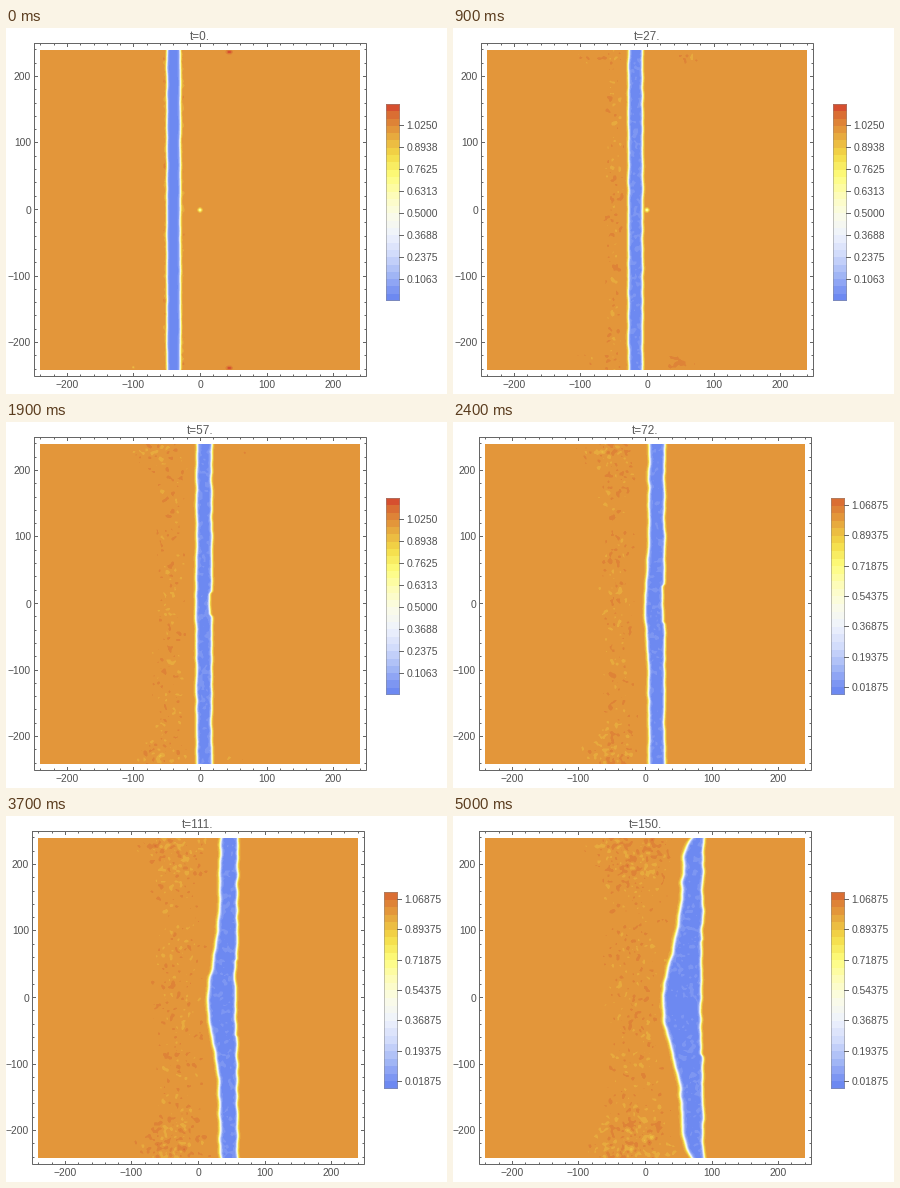
These frames come from a looping animation (441 by 366 pixels, 5.1 s). A matplotlib script:

```python
import numpy as np
import matplotlib.pyplot as plt
from matplotlib.animation import FuncAnimation
from matplotlib.colors import LinearSegmentedColormap

W, H, DPI = 441, 366, 100
FRAMES, STEP = 51, 3
T_END = STEP * (FRAMES - 1)
T_LEGEND = 60                   # the legend is rescaled from here on
PLOT = 320                      # side of the density plot in pixels
SUB = 2                         # supersampling
N = PLOT * SUB
CX, CY, SCALE = 194.5, 181.5, 0.6655
LOW, BAND = -0.025, 0.04375
GREY, INK = "#666666", "#505050"

plt.rcParams["font.family"] = "Liberation Sans"
rng = np.random.default_rng(12)

TEMPERATURE = LinearSegmentedColormap.from_list("temperature", [
    "#2e4eee", "#4f71f0", "#748ef2", "#a4b8f6", "#d1dbfb", "#eff3fd", "#fbfce8",
    "#fefdba", "#fdfc7b", "#f4dc48", "#e7a83e", "#db7334", "#d0222a"], N=1024)
PALETTE = TEMPERATURE(0.155 + 0.703 * (LOW + BAND * (np.arange(27) + 0.5)))[:, :3]

axis = (np.arange(N) + 0.5) / N * 480 - 240
X = axis[None, :]
Y = -axis[:, None]
WALL = 240 - np.abs(Y)          # distance to the upper or lower border


def noise(shape, sigma):
    """Periodic Gaussian noise with unit deviation."""
    freqs = np.meshgrid(*[np.fft.fftfreq(n) for n in shape], indexing="ij")
    blur = np.exp(-2 * (np.pi * sigma) ** 2 * sum(f ** 2 for f in freqs))
    out = np.fft.ifftn(np.fft.fftn(rng.normal(size=shape)) * blur).real
    return out / out.std()


GRAIN = [noise((N, N), 2.7) for _ in range(2)]
INNER = [noise((N, N), 2.6) for _ in range(2)]
FRONT = [noise((N,), 7)[:, None] for _ in range(2)]
BACK = [noise((N,), 7)[:, None] for _ in range(2)]


def blend(pair, angle):
    return np.cos(angle) * pair[0] + np.sin(angle) * pair[1]


def gauss(d, s):
    return np.exp(-0.5 * (d / s) ** 2)


def sigmoid(d):
    return 1 / (1 + np.exp(-np.clip(d, -40, 40)))


def edge(t, start, speed, drag, flare, rough):
    """Slowing wave edge whose ends bend forward at the borders."""
    s = t / T_END
    return (start + speed * t - drag * t ** 2 + flare * s ** 4 * np.exp(-WALL / 17)
            + (0.2 + 0.5 * s) * blend(rough, t / 25))


def front(t):
    half = 3 + 0.74 * max(t - 38, 0)
    dent = 4 * (1 - 0.5 * t / T_END) * sigmoid((t - 39) / 1.5)
    dent = dent * sigmoid(half - np.abs(Y))
    return edge(t, -29.5, 0.86, 0.0006, 4, FRONT) - dent


def back(t):
    bulge = 0.3 * max(t - 52, 0) * gauss(Y + 6, 18 + 0.34 * t)
    return edge(t, -49.5, 0.83, 0.0008, 13, BACK) - bulge


def ripple(t, left):
    """Strength of the specks around the wave."""
    s = t / T_END
    wake = gauss(X + 50 - 38 * s ** 2, 8 + 38 * s)
    rear = gauss(X + 110 - 80 * s, 12 + 35 * s) * gauss(WALL - 12, 8 + 24 * s)
    ahead = max(1 - t / 100, 0) * gauss(X - 48, 20) * gauss(WALL - 12, 10)
    behind = sigmoid((left - 4 - X) / 2)
    grow = 1 - np.exp(-t / 8)
    return grow * ((0.0145 * wake + 0.0135 * rear) * behind + 0.026 * ahead)


def field(t):
    s, turn = t / T_END, t / 13
    left, right = back(t), front(t)
    start = max(1 - t / 9, 0)
    amp = ripple(t, left) + 0.015 * start * (gauss(X - left + 4, 2) + gauss(X - right - 4, 2))
    outside = 1.005 + amp * blend(GRAIN, turn)
    inside = 0.004 + min(t / 15, 1) * 0.014 * blend(INNER, turn)
    hole = (sigmoid((X - left) / (0.9 + 0.5 * s))
            * sigmoid((right - X) / (0.95 + 0.15 * s)))
    u = outside * (1 - hole) + inside * hole
    if t < 33:
        u = u - 0.4 * gauss(np.hypot(X, Y), 1.9)
    u = u + 0.15 * start * gauss(X - 44, 2.8) * gauss(WALL - 3, 2)
    return u - 0.09 * start * gauss(X + 100, 1.3) * gauss(Y + 236, 1.3)


def render(t):
    band = np.clip((field(t) - LOW) // BAND, 0, 26).astype(int)
    return PALETTE[band].reshape(PLOT, SUB, PLOT, SUB, 3).mean((1, 3))


fig = plt.figure(figsize=(W / DPI, H / DPI), dpi=DPI, facecolor="white")
ax = fig.add_axes([0, 0, 1, 1])
ax.axis("off")


def text(x, y, s, px=10.2, ha="center", color=INK):
    return ax.text(x, y, s, fontsize=px * 0.72, ha=ha, va="center_baseline", color=color)


def line(xs, ys, color=GREY):
    return ax.plot(xs, ys, color=color, lw=0.72, snap=False,
                   solid_capstyle="projecting", solid_joinstyle="miter")[0]


def box(x0, y0, x1, y1, color=GREY):
    return line([x0, x1, x1, x0, x0], [y0, y0, y1, y1, y0], color)


def centre(v):
    return np.floor(v) + 0.5


def build(dx, bands, first, step, digits):
    """Frame, ticks and legend of one layout, shifted by dx pixels."""
    x0, x1, y0, y1 = 28.5 + dx, 360.5 + dx, 15.5, 348.5
    parts = [box(x0, y0, x1, y1)]
    for v in range(-240, 241, 20):
        size = 3 if v % 100 == 0 else 1.5
        px, py = centre(CX + dx + v * SCALE), centre(CY - v * SCALE)
        parts += [line([px, px], [y1, y1 - size]), line([px, px], [y0, y0 + size]),
                  line([x0, x0 + size], [py, py]), line([x1, x1 - size], [py, py])]
        if v % 100 == 0:
            label = str(v).replace("-", "\u2212")
            parts += [text(px - 0.5, 356, label),
                      text(x0 - 3.5, py, label, ha="right")]

    b0, b1, top, bottom = 380 + dx, 394 + dx, 76, 273
    parts.append(ax.imshow(PALETTE[:bands][::-1, None], extent=(b0, b1, bottom, top),
                           interpolation="nearest", aspect="auto"))
    parts.append(box(b0 + 0.5, top + 0.5, b1 - 0.5, bottom - 0.5, "#8a8a8a80"))
    unit = (bottom - top) / (bands * BAND)
    for value in np.arange(first, 0, -step):
        y = centre(bottom - (value - LOW) * unit)
        parts += [line([b1 - 0.5, b1 + 3.5], [y, y]),
                  text(b1 + 6.5, y - 0.5, f"{value + 1e-9:.{digits}f}", ha="left")]
    return parts


picture = ax.imshow(np.ones((PLOT, PLOT, 3)), interpolation="nearest", aspect="auto")
layouts = [build(0, 27, 1.025, 0.13125, 4), build(-2, 26, 1.06875, 0.175, 5)]
title = text(194, 8, "", 11.8, color="#5a5a5a")
ax.set_xlim(0, W)
ax.set_ylim(H, 0)


def update(i):
    t = i * STEP
    shown = int(t >= T_LEGEND)
    for n, parts in enumerate(layouts):
        for part in parts:
            part.set_visible(n == shown)
    dx = -2 * shown
    picture.set_data(render(t))
    picture.set_extent((34 + dx, 354 + dx, 342, 22))
    ax.set_xlim(0, W)
    ax.set_ylim(H, 0)
    title.set_text(f"t={t}.")
    title.set_x(194 + dx)
    return [picture, title]


anim = FuncAnimation(fig, update, frames=FRAMES, interval=100, repeat=True,
                     repeat_delay=0, blit=False)
plt.show()
```
